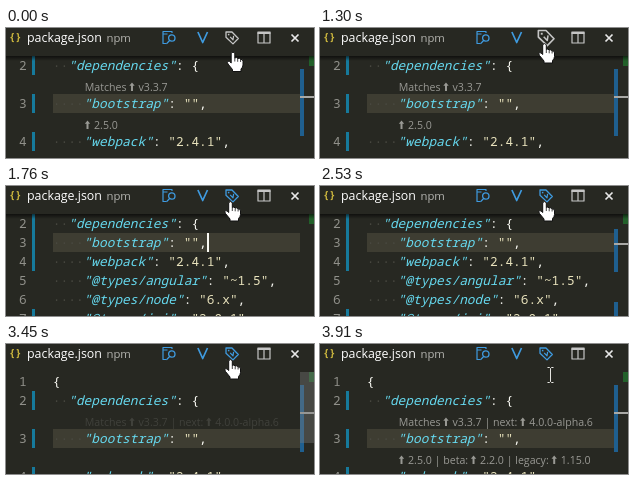
These frames come from a looping animation (308 by 130 pixels, 3.99 s). An HTML page with a canvas:

```html
<!DOCTYPE html>
<html lang="en">
<head>
<meta charset="utf-8">
<title>Dependency versions in an editor</title>
<style>
  html, body { margin: 0; width: 100%; height: 100%; overflow: hidden; background: #272822; }
  canvas { display: block; width: 308px; height: 130px; }
</style>
</head>
<body>
<canvas id="stage" width="308" height="130"></canvas>
<script>
const ctx = document.getElementById('stage').getContext('2d');
const LOOP = 3990, WIDTH = 308, HEIGHT = 130;
const ROW = 19, TOP = 28, LEFT = 46.8, CHAR = 7.7, RULER = 294;
const MONO = '12.83px "Noto Sans Mono", monospace';
const UI = '"Open Sans", sans-serif';
const COLOR = {
  back: '#272822', row: '#3e3d32', key: '#66d9ef', value: '#e8e2bc', plain: '#f8f8f2',
  number: '#90908a', lens: '#999994', edit: '#167a9c', blue: '#3f9be0', icon: '#c5c5c5',
  space: '#4a4a42', change: '#1f5f8f', added: '#22602a', mark: '#a9a9a6'
};

const LINES = [
  { indent: 0, parts: [['{', 'plain']] },
  { indent: 2, edited: true, parts: [['"dependencies"', 'key'], [': {', 'plain']] },
  entry('bootstrap', '', true),
  entry('webpack', '2.4.1', true),
  entry('@types/angular', '~1.5'),
  entry('@types/node', '6.x'),
  entry('@types/joi', '2.0.1', true)
];
const SHORT_LENS = { 2: 'Matches ⬆ v3.3.7', 3: '⬆ 2.5.0' };
const FULL_LENS = {
  2: 'Matches ⬆ v3.3.7 | next: ⬆ 4.0.0-alpha.6',
  3: '⬆ 2.5.0 | beta: ⬆ 2.2.0 | legacy: ⬆ 1.15.0'
};
const FADE_STEPS = [3450, 3600, 3680, 3760, 3830, 3910];

function entry(name, version, edited = false) {
  return {
    indent: 4, edited,
    parts: [[`"${name}"`, 'key'], [': ', 'plain'], [`"${version}"`, 'value'], [',', 'plain']]
  };
}

const isCompact = t => t >= 1760 && t < 2910;
const fadeStep = t => FADE_STEPS.filter(s => s <= t).pop();

function rect(x, y, w, h, color) {
  ctx.fillStyle = color;
  ctx.fillRect(x, y, w, h);
}

function text(str, x, y, font, color) {
  ctx.font = font;
  ctx.fillStyle = color;
  ctx.fillText(str, x, y);
  return ctx.measureText(str).width;
}

function path(d, { fill, stroke, width = 1 }) {
  const shape = new Path2D(d);
  if (fill) { ctx.fillStyle = fill; ctx.fill(shape); }
  if (stroke) { ctx.strokeStyle = stroke; ctx.lineWidth = width; ctx.stroke(shape); }
}

function at(x, y, draw, scale = 1) {
  ctx.save();
  ctx.translate(x, y);
  ctx.scale(scale, scale);
  draw();
  ctx.restore();
}

function drawLens(str, y, alpha) {
  ctx.save();
  ctx.globalAlpha = alpha;
  let x = 78.8;
  for (const piece of str.split(/(⬆)/)) {
    if (piece === '⬆') {
      at(x, y, () => path('M2.7 -8.5 L5.4 -5.3 H3.7 V0 H1.7 V-5.3 H0 Z', { fill: COLOR.lens }));
      x += 6.5;
    } else {
      x += text(piece, x, y, `10.6px ${UI}`, COLOR.lens);
    }
  }
  ctx.restore();
}

function drawLine(index, y, caret) {
  const { indent, edited, parts } = LINES[index];
  const current = index === 2;
  if (current) rect(47, y, RULER - 47, ROW, COLOR.row);
  if (edited) rect(26, y, 3, ROW, COLOR.edit);
  text(index + 1, 13, y + 14, MONO, COLOR.number);
  text('·'.repeat(indent), LEFT, y + 14, MONO, COLOR.space);
  let x = LEFT + indent * CHAR;
  for (const [str, color] of parts) {
    text(str, x, y + 14, (color === 'key' ? 'italic ' : '') + '500 ' + MONO, COLOR[color]);
    x += str.length * CHAR;
  }
  if (current && caret) rect(201, y, 2, ROW, COLOR.plain);
}

function drawEditor(t) {
  const first = t < 2910 ? 1 : 0;
  const lenses = t < 1760 ? SHORT_LENS : FULL_LENS;
  const step = fadeStep(t);
  const alpha = t < 1760 ? 1 : step ? Math.min(1, (step - 3330) / 550) : 0;
  const caret = (t >= 1460 && t < 2450) || (t >= 2990 && t < 3450);
  for (let i = first, y = TOP; i < LINES.length && y < HEIGHT; i++, y += ROW) {
    if (!isCompact(t) && i >= 2) {
      const shown = i === 2 || t < 1760 || t >= 3600;
      if (lenses[i] && shown) drawLens(lenses[i], y + 16, alpha);
      y += ROW;
    }
    drawLine(i, y, caret);
  }
}

function drawRuler(t) {
  const compact = isCompact(t);
  const unit = compact ? 14.6 : 13.3;
  const rowTop = row => Math.round(TOP + row * unit);
  const changed = (from, to) =>
    rect(RULER, rowTop(from), 4, rowTop(to) - rowTop(from), COLOR.change);
  if (!compact) changed(1, 6);
  else if (t >= 2450) { changed(1, 4); changed(6, 7); }
  rect(303, TOP, 5, 10, COLOR.added);
  if (!compact || t >= 2070) rect(RULER, rowTop(compact ? 2 : 3), 14, 2, COLOR.mark);
  if (t >= 2910) {
    const alpha = .4 * Math.max(0, Math.min(1, (3910 - (fadeStep(t) || 2910)) / 310));
    rect(RULER, TOP, 14, 71, `rgba(121, 121, 121, ${alpha})`);
  }
}

function drawScrollShadow() {
  const shade = ctx.createLinearGradient(0, TOP, 0, TOP + 5);
  shade.addColorStop(0, 'rgba(0, 0, 0, .6)');
  shade.addColorStop(1, 'rgba(0, 0, 0, 0)');
  rect(0, TOP, WIDTH, 5, shade);
}

function drawTag(color) {
  path('M-6 -5.5 L0 -5.5 L6.3 1 L1 6.4 L-6 -.3 Z', { stroke: color, width: 1.3 });
  path('M-4.1 -3.7 h1.5 v1.5 h-1.5 Z', { fill: color });
  path('M-1.8 -.6 L1 2.3 L1.6 -1.6', { stroke: color, width: 1.2 });
}

function drawSearch() {
  path('M-3 6 H-6 V-6 H3 V-4.5 M-6 -3.5 H-1.5', { stroke: COLOR.blue, width: 1.2 });
  path('M6 .5 a3.2 3.2 0 1 1 -6.4 0 a3.2 3.2 0 1 1 6.4 0 M.6 3 L-2.6 6.4',
       { stroke: COLOR.blue, width: 1.3 });
}

function drawHeader(t) {
  rect(0, 0, WIDTH, TOP, COLOR.back);
  text('{}', 3, 13, 'bold 10.5px "Noto Sans Mono", monospace', '#cbb63e');
  text('package.json', 21, 14, `12.4px ${UI}`, '#ffffff');
  text('npm', 100.5, 14, `11.3px ${UI}`, '#b5b5b0');
  at(163, 9.5, drawSearch);
  at(196.7, 9.5, () => path('M-4.8 -5.5 L0 5 L4.8 -5.5', { stroke: COLOR.blue, width: 1.7 }));
  const pressed = t >= 1300 && t < 1460;
  at(226, 9.5, () => drawTag(t < 1460 ? COLOR.icon : COLOR.blue), pressed ? 1.272 : 1);
  at(258, 9.5, () => {
    path('M-6 -5 H6 V5.5 H-6 Z M0 -5 V5.5', { stroke: COLOR.icon, width: 1.2 });
    path('M-6.5 -6 H6.5 V-3.5 H-6.5 Z', { fill: COLOR.icon });
  });
  at(289, 10, () => path('M-3.5 -3.5 L3.5 3.5 M3.5 -3.5 L-3.5 3.5', { stroke: '#e8e8e8', width: 1.7 }));
}

function drawHand() {
  path('M-1.8 1.2 Q0 -1 1.8 1.2 V6 Q3.5 4.8 4.7 6.5 Q6.6 5.6 7.6 7.4 Q10 7 10 9.5 V13 ' +
       'Q9.8 15.5 8 17 V19.5 H-.5 V17.5 L-5 12 Q-6.4 10 -5 9.2 Q-3.6 8.7 -1.8 11 Z',
       { fill: '#ffffff', stroke: '#111111' });
  path('M1.8 6 V9.5 M4.7 6.7 V9.8 M7.6 7.5 V10', { stroke: '#111111', width: .8 });
}

function drawBeam() {
  path('M-3 -7.5 H-1 L0 -6.5 L1 -7.5 H3 M0 -6.5 V6.5 M-3 7.5 H-1 L0 6.5 L1 7.5 H3',
       { stroke: '#e4e4e0' });
}

function drawPointer(t) {
  if (t >= 3830) return at(230.5, t < 3910 ? 30 : 31, drawBeam);
  if (t < 1070) return at(227, 24, drawHand);
  if (t < 1150) return at(224, 17, drawHand);
  const step = t < 3600 ? 0 : t < 3680 ? 1 : t < 3760 ? 2 : 3;
  at(224.5 + step * 1.5, 15.5 + step * 3, drawHand);
}

function render(now) {
  const t = now % LOOP;
  rect(0, 0, WIDTH, HEIGHT, COLOR.back);
  drawEditor(t);
  drawRuler(t);
  if (t < 2910) drawScrollShadow();
  drawHeader(t);
  drawPointer(t);
  requestAnimationFrame(render);
}

ctx.lineJoin = 'round';
render(0);
</script>
</body>
</html>
```
